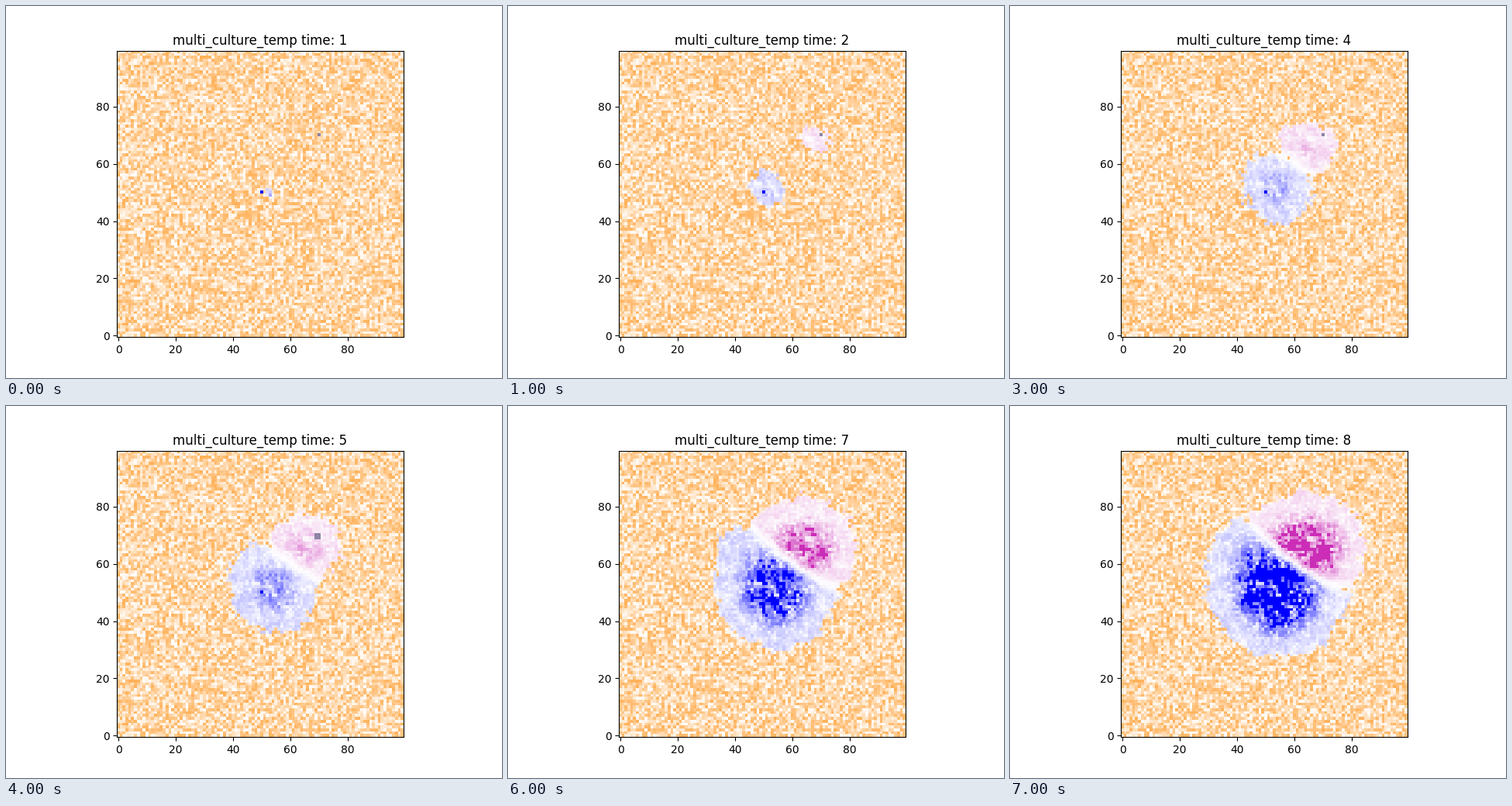
A matplotlib script for the animation above (8000 ms loop, 640 by 480 pixels).

```python
import numpy as np
import matplotlib.pyplot as plt
from matplotlib.animation import FuncAnimation

SIZE = 100
STEPS = 8
WHITE = np.array([255, 255, 255])
ORANGE = np.array([255, 178, 90])
BLUE = np.array([0, 0, 255])
PINK = np.array([203, 45, 183])
MAUVE = np.array([142, 132, 165])

rng = np.random.default_rng(12)
ys, xs = np.mgrid[0:SIZE, 0:SIZE]
nutrient = rng.random((SIZE, SIZE))


def clumps():
    """Noise of unit spread whose neighbouring cells resemble each other."""
    noise = rng.normal(size=(SIZE, SIZE))
    for axis in (0, 1):
        noise = noise + np.roll(noise, 1, axis) + np.roll(noise, -1, axis)
    return noise / noise.std()


vigour = 1 + 0.36 * rng.normal(size=(SIZE, SIZE)) + 0.28 * clumps()
vigour = np.clip(vigour, 0.15, 1.8)
roughness = 0.65 * rng.normal(size=(SIZE, SIZE)) + 0.7 * clumps()

# The curved front where the colonies meet; cells near it stay thin
front = 60 - 0.72 * (xs - 60) + 0.013 * (xs - 60) ** 2
crowding = np.clip(np.abs(ys - front) / 3.5, 0.12, 1)


def mix(base, colour, amount):
    return base + (colour - base) * np.asarray(amount)[..., None]


class Colony:
    def __init__(self, colour, seed, centre, start, speed, vigour_peak, bulge, side):
        self.colour = colour
        self.seed = np.array(seed)
        self.centre = np.array(centre)
        self.start, self.speed = start, speed
        self.peak = vigour_peak
        self.bulge = bulge
        self.side = side

    def distance(self, step):
        """Distance from the drifting centre, shortened along the bulge."""
        cx, cy = self.seed + (self.centre - self.seed) * min(step / 3, 1)
        dx, dy = xs - cx, ys - cy
        heading, height, width = self.bulge
        off = (np.degrees(np.arctan2(dy, dx)) - heading + 180) % 360 - 180
        return np.hypot(dx, dy) / (1 + height * np.exp(-(off / width) ** 2))

    def grow(self, img, step):
        radius = self.start + self.speed * step
        dist = self.distance(step)
        density = self.peak * (0.19 + 0.76 * (step / (STEPS - 1)) ** 3)
        falloff = np.exp(-(dist / radius / 0.6) ** 3)
        value = np.maximum(0.12, density * falloff) * vigour * crowding
        value = np.where(value > 0.72, 1, value)
        alive = (dist + roughness < radius) & self.side
        img[alive] = mix(WHITE, self.colour, value)[alive]


blue = Colony(BLUE, (50, 50), (54.5, 51), 2.6, 3.1, 1, (128, 0.2, 30), ys <= front)
pink = Colony(PINK, (70, 70), (65.5, 65.5), 1.8, 2.55, 0.85, (152, 0.22, 24), ys > front)


def culture(step):
    img = mix(WHITE, ORANGE, nutrient)
    if step == 0:
        img[49:52, 52:54] = mix(WHITE, BLUE, 0.2 * vigour[49:52, 52:54])
    else:
        blue.grow(img, step)
        pink.grow(img, step)

    # Founder cells stand out until the colonies catch up
    if step < 5:
        size = 1 + step // 4
        img[50, 50] = BLUE
        img[71 - size:71, 71 - size:71] = MAUVE
    return img.astype(np.uint8)


fig, ax = plt.subplots(figsize=(6.4, 4.8), dpi=100)
picture = ax.imshow(culture(0), origin="lower", interpolation="nearest")
title = ax.set_title("multi_culture_temp time: 1")


def update(step):
    picture.set_data(culture(step))
    title.set_text(f"multi_culture_temp time: {step + 1}")
    return picture, title


anim = FuncAnimation(fig, update, frames=STEPS, interval=1000, repeat=True, repeat_delay=0)
plt.show()
```
